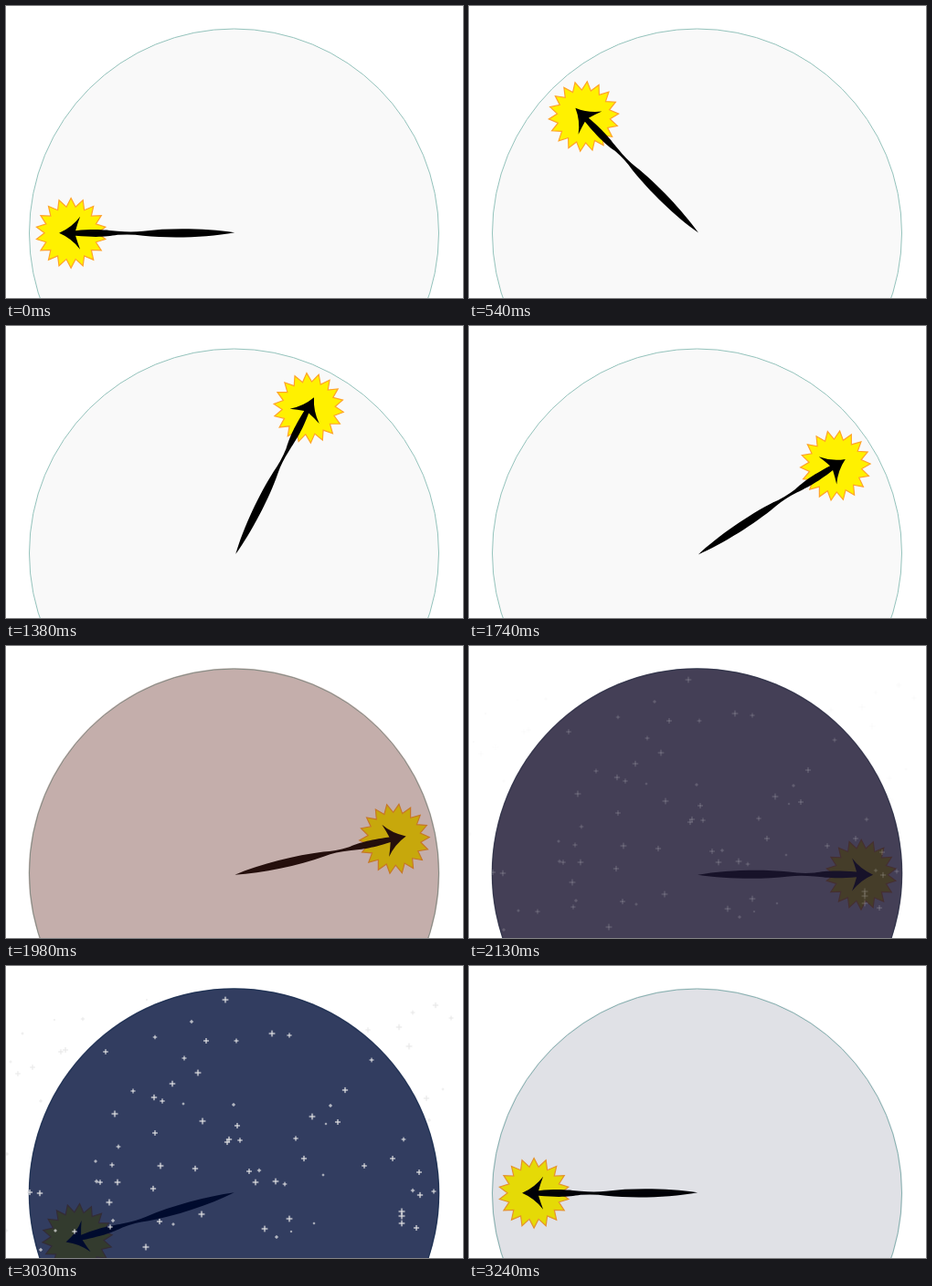
Write an HTML page with a canvas that moves like this. It is 500x320 px and loops after 3270 ms.

```html
<!DOCTYPE html>
<html>
<head>
<meta charset="utf-8">
<title>Day and night</title>
<style>
html, body { margin: 0; overflow: hidden; background: #fff; }
canvas { display: block; }
</style>
</head>
<body>
<canvas id="stage" width="500" height="320"></canvas>
<script>
const ctx = document.getElementById('stage').getContext('2d');
const STEP = 30, STEPS = 109;
const DUSK = [158, 58, 19], NIGHT = [0, 14, 58];

let seed = 7;
const random = () => (seed = seed * 16807 % 2147483647) / 2147483647;

const stars = Array.from({ length: 95 }, () => ({
  x: Math.round(random() * 490),
  y: Math.round(36 + random() * 276),
  len: 1.5 + 5.5 * Math.sqrt(random())
}));

// Tail at the origin, tip to the left
const arrow = new Path2D('M-192 0Q-178-6-169-18Q-172-10-174-2.6C-150-5-140-3-128-2Q-113-.4-100-2C-70-6-30-5 0-.6' +
  'C-30 5-70 6-100 3Q-113 .8-128 2C-140 4-150 5-174 3Q-172 10-169 18Q-178 6-192 0Z');

const sun = new Path2D();
for (let i = 0; i < 36; i++) {
  const a = i * Math.PI / 18, r = i % 2 ? 29 : 38.3;
  sun.lineTo(-179 + r * Math.sin(a), -r * Math.cos(a));
}
sun.closePath();

const clamp = v => Math.max(0, Math.min(1, v));

function disc(r, fill) {
  ctx.beginPath();
  ctx.arc(249.5, 249, r, 0, 7);
  ctx.fillStyle = fill;
  ctx.fill();
}

function drawHand(n) {
  // Setting and rising run at slightly different speeds; the switch is hidden by night
  const deg = n < 90 ? n * 2.537 : (n - 108) * 2.314;
  ctx.save();
  ctx.translate(250.1, 249.5);
  ctx.rotate(deg * Math.PI / 180);
  ctx.translate(0, -0.7);
  ctx.fillStyle = '#fff100';
  ctx.fill(sun);
  ctx.strokeStyle = '#ffa32b';
  ctx.lineWidth = 1.2;
  ctx.stroke(sun);
  ctx.fillStyle = '#000';
  ctx.fill(arrow);
  ctx.restore();
}

function drawStars(alpha) {
  ctx.save();
  ctx.globalAlpha = alpha;
  ctx.fillStyle = 'rgba(232,232,232,.58)';
  for (const { x, y, len } of stars) {
    const w = 0.8 + len * 0.2;
    ctx.fillRect(x - len / 2, y - w / 2, len, w);
    ctx.fillRect(x - w / 2, y - len / 2, w, len);
  }
  ctx.restore();
}

function draw(n) {
  ctx.fillStyle = '#fff';
  ctx.fillRect(0, 0, 500, 320);
  disc(224, '#f9f9f9');
  ctx.strokeStyle = '#94c3bc';
  ctx.lineWidth = 1;
  ctx.stroke();
  drawHand(n);

  const dusk = clamp((n - 62) / 11);
  const shade = dusk * clamp((109 - n) / 10);
  if (shade) {
    const rgb = DUSK.map((c, i) => c + (NIGHT[i] - c) * dusk);
    disc(224.8, `rgba(${rgb},${shade})`);
  }
  const glow = clamp((n - 70) / 5) * clamp((107 - n) / 5);
  if (glow) drawStars(glow);
}

const start = performance.now();
function tick() {
  draw(Math.floor((performance.now() - start) / STEP) % STEPS);
  requestAnimationFrame(tick);
}
tick();
</script>
</body>
</html>
```
